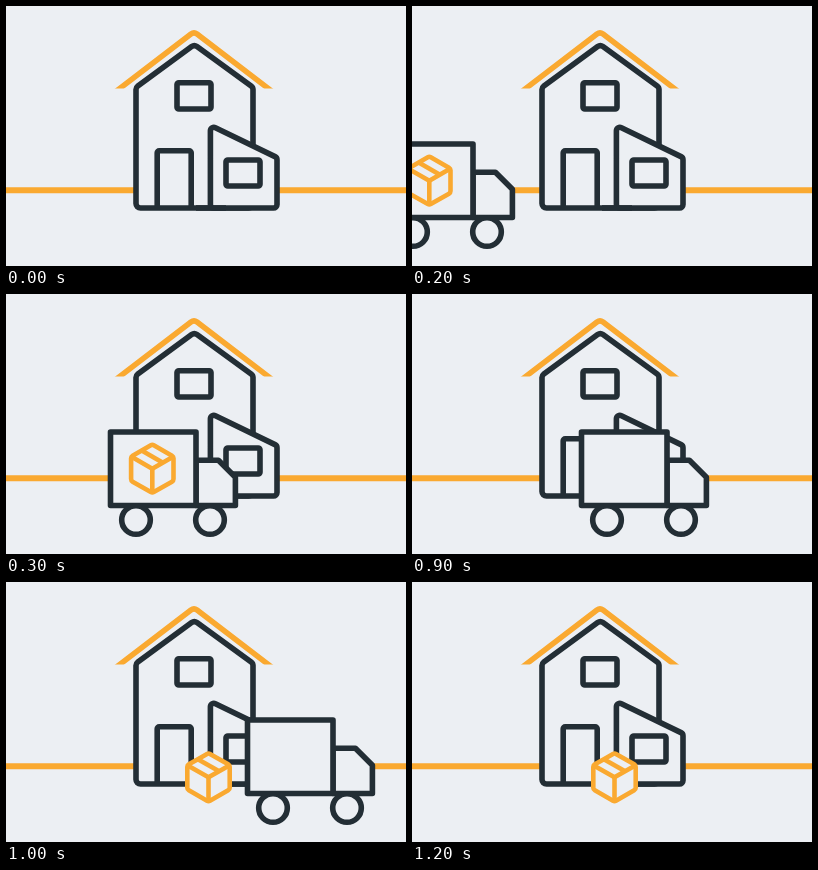
An HTML page with a canvas for the animation above (1.8 s loop, 400 by 260 pixels).

```html
<!DOCTYPE html>
<html lang="en">
<head>
<meta charset="utf-8">
<title>House delivery</title>
<style>
  html, body { margin: 0; width: 100%; height: 100%; overflow: hidden; background: #eceff3; }
  canvas { display: block; }
</style>
</head>
<body>
<canvas id="stage" width="400" height="260"></canvas>
<script>
const ctx = document.getElementById('stage').getContext('2d');
const BG = '#eceff3', DARK = '#232e35', ORANGE = '#faa930';
const LOOP = 1800, STEP = 100;

// Polyline or polygon whose corners are rounded with radius r.
function outline(points, { r = 0, closed = false, color = DARK, width = 5.6, fill = null } = {}) {
  const n = points.length;
  const [ax, ay] = points[0], [bx, by] = points[n - 1];
  ctx.beginPath();
  if (closed) ctx.moveTo((ax + bx) / 2, (ay + by) / 2);
  else ctx.moveTo(ax, ay);
  for (let i = closed ? 0 : 1; i < (closed ? n : n - 1); i++) {
    const [x, y] = points[i], [nx, ny] = points[(i + 1) % n];
    ctx.arcTo(x, y, nx, ny, r);
  }
  if (closed) ctx.closePath();
  else ctx.lineTo(bx, by);
  if (fill) {
    ctx.fillStyle = fill;
    ctx.fill();
  }
  ctx.strokeStyle = color;
  ctx.lineWidth = width;
  ctx.lineJoin = 'round';
  ctx.stroke();
}

function box(x0, y0, x1, y1, r) {
  outline([[x0, y0], [x1, y0], [x1, y1], [x0, y1]], { r, closed: true, fill: BG });
}

function drawRoof() {
  ctx.save();
  ctx.beginPath();
  ctx.rect(0, 0, 400, 82.6);
  ctx.clip();
  outline([[106, 88.4], [188, 25.7], [270, 88.4]], { r: 5, color: ORANGE, width: 5.5 });
  ctx.restore();
}

function drawHouse() {
  outline([[0, 184.3], [400, 184.3]], { color: ORANGE, width: 6 });
  drawRoof();
  outline([[130, 202], [130, 81.3], [188.3, 38.6], [247, 81.3], [247, 202]],
    { r: 4.5, closed: true, fill: BG });
  box(171, 76.8, 205, 103, 1.8);
  outline([[151.2, 202], [151.2, 144.8], [185.2, 144.8], [185.2, 202]], { r: 2 });
  outline([[204.4, 202], [204.4, 119.2], [271, 151.6], [271, 202]],
    { r: 3.5, closed: true, fill: BG });
  outline([[190, 202], [220, 202]]);
  box(220, 154, 254, 180, 1.8);
}

function drawTruck(dx) {
  ctx.save();
  ctx.translate(dx, 0);
  outline([[190, 166.3], [212.4, 166.3], [229.4, 183.3], [229.4, 211.5], [190, 211.5]],
    { closed: true, fill: BG });
  box(104.5, 138, 190, 211.5, 0);
  for (const x of [130, 204]) {
    ctx.beginPath();
    ctx.arc(x, 226, 14.3, 0, Math.PI * 2);
    ctx.fillStyle = BG;
    ctx.fill();
    ctx.stroke();
  }
  ctx.restore();
}

function drawParcel(x, y) {
  const pen = { color: ORANGE, width: 4.6 };
  const w = 21.2, h = 12.1;
  ctx.save();
  ctx.translate(x, y);
  outline([[0, -2 * h], [w, -h], [w, h], [0, 2 * h], [-w, h], [-w, -h]],
    { ...pen, r: 3, closed: true, fill: BG });
  outline([[-w, -h], [0, 0], [w, -h]], pen);
  outline([[0, 0], [0, 2 * h]], pen);
  outline([[-w / 2, -1.5 * h], [w / 2, -0.5 * h]], pen);
  ctx.restore();
}

// Truck offset from its parking spot, or null while it is off stage.
function truckOffset(step) {
  if (step < 1 || step >= 12) return null;
  if (step < 3) return -129 - 72 * (2 - step);
  if (step < 9) return 0;
  return 65 + 72 * (step - 9);
}

function draw(now) {
  const step = Math.floor((now % LOOP) / STEP);
  const dx = truckOffset(step);
  ctx.fillStyle = BG;
  ctx.fillRect(0, 0, 400, 260);
  drawHouse();
  if (dx !== null) drawTruck(dx);
  if (step >= 1 && step < 6) drawParcel(146.3 + dx, 174.7);
  if (step >= 10) drawParcel(202.5, 195.3);
}

const start = performance.now();
function tick() {
  draw(performance.now() - start);
  requestAnimationFrame(tick);
}
tick();
</script>
</body>
</html>
```
